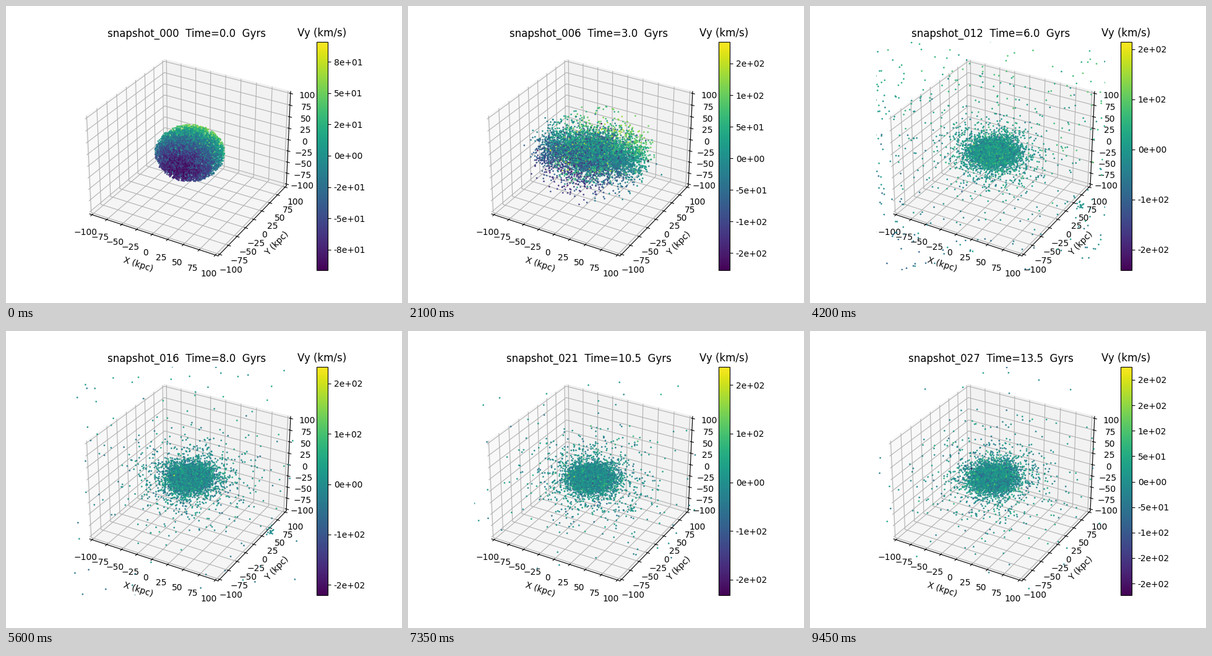
These frames come from a looping animation (640 px wide and 480 px high, 9.8 s). A matplotlib script:

```python
import numpy as np
import matplotlib.pyplot as plt
from matplotlib.animation import FuncAnimation
from matplotlib.cm import ScalarMappable
from matplotlib.colors import Normalize

FRAMES, INTERVAL = 28, 350
N_CORE, N_HALO, N_EJECT, N_LOBE, N_CLUMP = 3200, 2100, 1800, 900, 14
N = N_CORE + N_HALO + N_EJECT + N_LOBE + N_CLUMP
T_BOUNCE = 2.18  # Gyr, end of the first collapse

rng = np.random.default_rng(7)


def unit(v):
    return v / np.linalg.norm(v, axis=1, keepdims=True)


def column(values):
    return np.asarray(values)[:, None]


# uniform ball that expands, turns around and collapses
ball = unit(rng.normal(size=(N, 3))) * column(rng.random(N) ** (1 / 3))

# relaxed core and extended halo, both on elliptical orbits
core_a, core_b = rng.normal(0, 15, (2, N_CORE, 3)) * [1, 1, 0.6]
core_w = column(rng.normal(2.8, 0.5, N_CORE))
halo_a, halo_b = rng.normal(0, 0.6, (2, N_HALO, 3)) * [1, 1, 0.8]
halo_r = column(38 * np.exp(rng.normal(0, 0.75, N_HALO)))
halo_w = np.minimum(50 / halo_r, 3)

# material thrown out at the bounce, with two opposite streams
out_dir = unit(rng.normal(size=(N_EJECT, 3)) * [1, 0.8, 0.42])
lobe_phi = rng.normal(0.2, 0.33, N_LOBE) + np.pi * (rng.random(N_LOBE) < 0.45)
lobe_dir = unit(np.column_stack([np.cos(lobe_phi), np.sin(lobe_phi),
                                 rng.normal(0, 0.18, N_LOBE)]))
eject_dir = np.vstack([out_dir, lobe_dir])
eject_v = column(np.concatenate([30 + 120 * np.sqrt(rng.random(N_EJECT)),
                                 rng.normal(100, 25, N_LOBE)]))
eject_t = column(rng.normal(2.45, 0.04, N_EJECT + N_LOBE))

# small clump that falls back to the centre
clump = rng.normal(0, 3, (N_CLUMP, 3))
CLUMP_T = [2.5, 4, 6, 8, 10.5, 13.5]
CLUMP_X = [5, 130, 168, 162, 88, 24]
CLUMP_Y = [0, -45, -62, -68, -45, 14]

jitter = rng.normal(0, 4, N)

CLIM_T = [0, 0.5, 1, 1.5, 2, 2.5, 3, 4, 6, 8, 10.5, 13.5]
CLIM_LO = [-91.4, -45, -30, -57, -128, -240, -177.6, -221, -241, -221, -232.4, -223.3]
CLIM_HI = [91, 44, 30, 56, 126, 245, 184.7, 192.2, 215, 233.7, 237.8, 226]


def orbit(a, b, w, t):
    return a * np.cos(w * t) + b * np.sin(w * t)


def collapse(t):
    r = 85 * (1 - ((t - 0.93) / 1.25) ** 2) ** (2 / 3)
    turn = -0.3 * np.log(1 + 1.5 * t)
    c, s = np.cos(turn), np.sin(turn)
    return r * ball @ np.array([[c, s, 0], [-s, c, 0], [0, 0, 1]])


def relaxed(t):
    swell = 1 + 0.6 * np.exp(-((t - 3) / 0.4) ** 2)
    reach = halo_r * (1 - np.exp(-32 * (t - T_BOUNCE) / halo_r))
    centre = [np.interp(t, CLUMP_T, CLUMP_X), np.interp(t, CLUMP_T, CLUMP_Y), 0]
    return np.vstack([
        swell * orbit(core_a, core_b, core_w, t),
        reach * orbit(halo_a, halo_b, halo_w, t),
        eject_dir * eject_v * np.maximum(t - eject_t, 0.1),
        clump + centre,
    ])


def positions(t):
    return collapse(t) if t < T_BOUNCE else relaxed(t)


def velocity_y(t, h=0.01):
    return (positions(t + h) - positions(t - h))[:, 1] / (2 * h) + jitter


fig = plt.figure(figsize=(6.4, 4.8), dpi=100)
ax = fig.add_subplot(projection="3d")
norm = Normalize(CLIM_LO[0], CLIM_HI[0])
mappable = ScalarMappable(norm, "viridis")
bar = fig.colorbar(mappable, ax=ax, format="%.0e")
bar.ax.set_title("Vy (km/s)")

pad = 200 / 48
ticks = np.arange(-100, 101, 25)
ax.set(xlim=(-100 - pad, 100 + pad), ylim=(-100 - pad, 100 + pad),
       zlim=(-100 - pad, 100 + pad), xticks=ticks, yticks=ticks, zticks=ticks,
       xlabel="X (kpc)", ylabel="Y (kpc)")

cloud = None


def draw(i):
    global cloud
    t = i / 2
    if cloud is not None:
        cloud.remove()
    mappable.set_clim(np.interp(t, CLIM_T, CLIM_LO), np.interp(t, CLIM_T, CLIM_HI))
    p, vy = positions(t), velocity_y(t)
    near = np.linalg.norm(p, axis=1) < 400
    cloud = ax.scatter(*p[near].T, c=vy[near], cmap="viridis", norm=norm,
                       s=1, alpha=0.85, depthshade=False)
    # 3D axes scale the title height by 0.92
    ax.set_title(f"snapshot_{i:03d}  Time={t:.1f}  Gyrs", y=1 / 0.92)
    return [cloud]


anim = FuncAnimation(fig, draw, frames=FRAMES, interval=INTERVAL,
                     init_func=lambda: [], repeat=True, repeat_delay=0)
plt.show()
```
